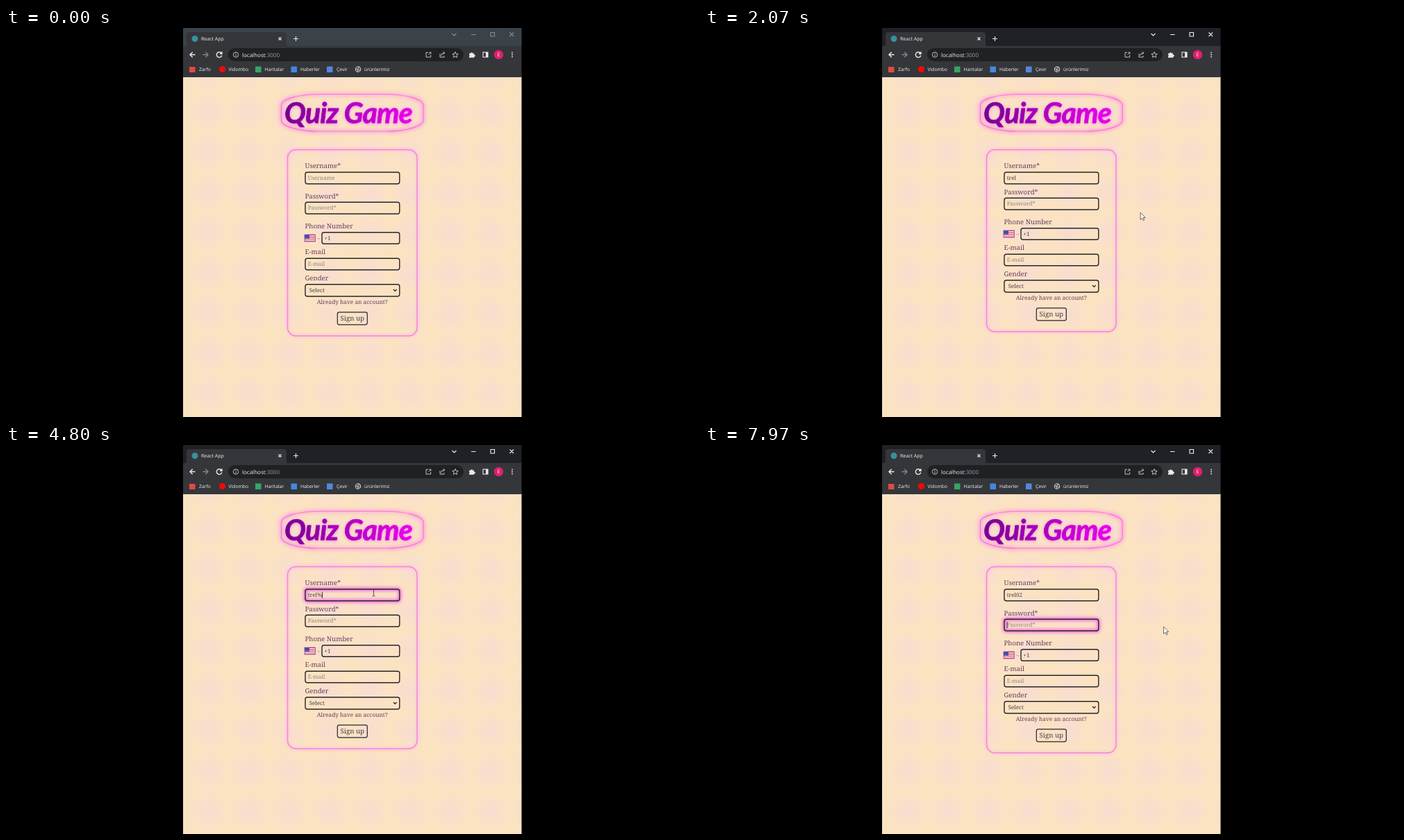
Recreate the animation shown at these times as an HTML page. Size 998 by 561 pixels, loop 8 s.

```html
<!DOCTYPE html>
<html lang="en">
<head>
<meta charset="utf-8">
<title>Quiz Game</title>
<style>
  html, body { margin: 0; width: 100%; height: 100%; overflow: hidden; background: #000; }
  svg { display: block; width: 100%; height: 100%; text-rendering: geometricPrecision; }
  .ui { font: 6.8px "Open Sans", sans-serif; fill: #f1f1f2; }
  .icon { fill: none; stroke: #e8eaed; stroke-width: 1.1; }
  .form { font: 8px "Noto Serif", serif; fill: #4a3d42; }
  .label { font-size: 9.6px; fill: #633f64; }
  .hint { fill: #91857a; }
  .box { fill: none; stroke: #29252a; stroke-width: 1.4; }
  .focus { filter: drop-shadow(0 0 2px #f03cf0) drop-shadow(0 0 2px #f03cf0); }
  .card { fill: none; stroke: #fb7de6; stroke-width: 1.4; filter: drop-shadow(0 0 2px #ff9cec); }
  .frame { fill: none; stroke: #ff70df; stroke-width: 1.2;
           filter: drop-shadow(0 0 2px #ff70e4) drop-shadow(0 0 3px #ff8be2); }
  .title { font: italic 700 41px Lato, sans-serif; letter-spacing: -.8px; fill: url(#ink);
           stroke: url(#ink); stroke-width: .8; stroke-linejoin: round;
           filter: drop-shadow(0 1px 2px #f08be0); }
  .note { font: 700 6.6px "Noto Serif", serif; fill: #fff; }
</style>
</head>
<body>
<svg viewBox="0 0 998 561">
  <defs>
    <linearGradient id="ink" gradientUnits="userSpaceOnUse" x1="402" x2="597" y1="0" y2="0">
      <stop offset="0" stop-color="#78008f"/>
      <stop offset=".5" stop-color="#b500c6"/>
      <stop offset="1" stop-color="#f600f6"/>
    </linearGradient>
    <radialGradient id="blush">
      <stop offset="0" stop-color="#f7dad6" stop-opacity=".75"/>
      <stop offset="1" stop-color="#f7dad6" stop-opacity="0"/>
    </radialGradient>
    <pattern id="paper" width="58" height="58" patternUnits="userSpaceOnUse" x="263" y="93">
      <rect width="58" height="58" fill="#fbe3c2"/>
      <circle cx="29" cy="29" r="29" fill="url(#blush)"/>
    </pattern>
  </defs>

  <rect width="998" height="561"/>
  <rect x="255" y="70" width="487.5" height="491" fill="url(#paper)"/>

  <!-- Browser window -->
  <rect id="strip" x="255" width="487.5" height="27"/>
  <rect x="255" y="26" width="487.5" height="45" fill="#35363a"/>
  <path d="M257 26.5q3 0 3-4V10q0-4 4-4h136q4 0 4 4v12.500q0 4 3 4z" fill="#35363a"/>
  <rect x="320" y="29" width="339" height="19" rx="9.500" fill="#202124"/>
  <circle cx="272" cy="15.500" r="4.500" fill="#3c8ea0"/>
  <g class="ui">
    <text x="281" y="18" font-size="7">React App</text>
    <text x="340" y="41.500" font-size="8">localhost<tspan fill="#9aa0a6">:3000</tspan></text>
    <text x="278" y="62">Zarfo</text>
    <text x="320.500" y="62">Vidombo</text>
    <text x="372.500" y="62">Haritalar</text>
    <text x="424" y="62">Haberler</text>
    <text x="476" y="62">Çevir</text>
    <text x="516" y="62">ürünlerimiz</text>
    <circle cx="709.500" cy="38.500" r="6.700" fill="#e01f6c"/>
    <text x="709.500" y="41.300" font-size="7.500" text-anchor="middle">E</text>
  </g>
  <rect x="264" y="56" width="8.500" height="8" fill="#df4b41"/>
  <circle cx="311.500" cy="59.500" r="4.600" fill="#f00a0a"/>
  <rect x="359" y="55.500" width="8.500" height="8.500" fill="#36a564"/>
  <rect x="410.500" y="55.500" width="8.500" height="8.500" fill="#4387e0"/>
  <rect x="462" y="55.500" width="8.500" height="8.500" fill="#5089df"/>
  <g class="icon">
    <path d="M392.500 13.500l4 4m0-4l-4 4M414 15.500h7m-3.500-3.500v7"/>
    <path d="M272.500 38.500h-7.500m3.700-3.700l-3.700 3.700l3.700 3.700" stroke-width="1.4"/>
    <path d="M283.500 38.500h7.500m-3.700-3.700l3.700 3.700l-3.700 3.700" stroke="#85888d" stroke-width="1.3"/>
    <path d="M310.300 36.500a3.800 3.800 0 1 0 .5 3M311 34.300v3h-3" stroke-width="1.4"/>
    <g stroke="#bfc2c7" stroke-width="1">
      <circle cx="331" cy="38.500" r="3.700"/>
      <path d="M331 38v2.500m0-4.300v.9"/>
      <path d="M608 35.300h-3v6.700h6.700v-3M608.500 38.500l3.400-3.400m-2.400 0h2.400v2.400"/>
      <path d="M625 37v5h6v-2M626.500 40q.5-4 5-4m-2-2l2.300 2l-2.300 2"/>
      <path d="M647 34.500l1.200 2.700 3 .3-2.300 2 .7 2.900-2.600-1.500-2.600 1.500.7-2.900-2.300-2 3-.3z"/>
    </g>
    <path d="M667 36.500h2.300a1.300 1.300 0 1 1 2.600 0h2.100v2.300a1.300 1.300 0 1 1 0 2.400v1.500h-7v-2a1.300 1.300 0 0 0 0-2.300z" fill="#e8eaed" stroke="none"/>
    <rect x="687" y="35" width="7" height="7"/>
    <rect x="691" y="35" width="3" height="7" fill="#e8eaed" stroke="none"/>
    <path d="M729 35.500v0m0 3v0m0 3v0" stroke-width="1.800" stroke-linecap="round"/>
    <circle cx="507" cy="59.500" r="3.700" stroke="#c4c7cc"/>
    <path d="M503.500 58.500l3 1.500l1-3h2.500M506 63l1-2.500l3 0" stroke="#c4c7cc"/>
  </g>
  <path id="controls" class="icon" d="M642.500 8l3 3l3-3M670 9.500h6.500M698 6.500h5.500v5.500h-5.500zM725.500 6.500l5.500 5.500m0-5.500l-5.500 5.500"/>

  <!-- Page -->
  <rect class="frame" x="396.500" y="95.500" width="204.500" height="53.500" rx="55" ry="16"/>
  <text class="title" x="401" y="137">Quiz Game</text>
  <rect id="card" class="card" x="405.500" y="175.500" width="186.500" rx="12"/>
  <g class="form">
    <text class="label" x="430.500" y="202.300">Username*</text>
    <rect id="nameBox" class="box" x="431" y="208" width="135.800" height="16.700" rx="3"/>
    <text id="name" x="434.700" y="219"></text>

    <g id="note">
      <rect x="432" y="228" width="133" height="17" rx="3" fill="#ee00ee"/>
      <circle cx="456.300" cy="236.700" r="4.700" fill="none" stroke="#fff"/>
      <path d="M456.300 233.700v3.500m0 1.200v1.200" stroke="#fff" stroke-width="1.100"/>
      <text class="note" x="462" y="235">Username must contain;</text>
      <text class="note" id="rule" x="462" y="243"></text>
    </g>

    <g id="below">
      <text class="label" x="430.500" y="245.500">Password*</text>
      <rect id="passBox" class="box" x="431" y="251.300" width="135.800" height="16.700" rx="3"/>
      <text class="hint" x="434.700" y="262.300">Password*</text>

      <text class="label" x="430.500" y="288.800">Phone Number</text>
      <rect x="430" y="298" width="15.500" height="10" fill="#fff"/>
      <path d="M430 298.700h15.500m-15.500 2.800h15.500m-15.500 2.800h15.500m-15.500 2.800h15.500" stroke="#e0344c" stroke-width="1.300"/>
      <rect x="430" y="298" width="7" height="5.500" fill="#3d52a8"/>
      <rect x="430" y="298" width="15.500" height="10" fill="none" stroke="#8246c0" stroke-width=".8"/>
      <path d="M448.500 303l1.700 1.500l1.700-1.500" fill="none" stroke="#a5968d" stroke-width=".9"/>
      <rect class="box" x="455" y="294.800" width="111.800" height="16.500" rx="3"/>
      <text x="458.500" y="305.800">+1</text>

      <text class="label" x="430.500" y="326.200">E-mail</text>
      <rect class="box" x="431" y="332.300" width="135.800" height="16.500" rx="3"/>
      <text class="hint" x="434.700" y="343.200">E-mail</text>

      <text class="label" x="430.500" y="363.500">Gender</text>
      <rect class="box" x="431" y="369.700" width="135.800" height="17.300" rx="3"/>
      <text x="436.700" y="381.200">Select</text>
      <path d="M558 377l2.300 2.400l2.300-2.400" fill="none" stroke="#222" stroke-width="1.300"/>

      <text class="label" x="498.700" y="398.200" text-anchor="middle" style="font-size:8.300px">Already have an account?</text>
      <rect class="box" x="477.300" y="409.800" width="43" height="18" rx="2.500" style="stroke-width:1.200"/>
      <text x="498.800" y="422" text-anchor="middle" style="font-size:9.700px">Sign up</text>
    </g>
    <path id="caret" d="M0 0v9" stroke="#222" stroke-width=".9"/>
  </g>

  <path id="arrow" d="M0 0v10.300l2.300-2.200l1.700 3.600l1.700-.8l-1.700-3.400h3.200z" fill="#fff" stroke="#333" stroke-width=".7"/>
  <path id="beam" d="M-2-5q2 0 2 1q0-1 2-1M0-4v8M-2 5q2 0 2-1q0 1 2 1" fill="none" stroke="#444" stroke-width=".9"/>
</svg>
<script>
const LOOP = 8000;
const $ = id => document.getElementById(id);

// Each entry holds from its time until the next one.
const typed = [[0, ''], [1280, 't'], [1370, 'tr'], [1470, 'tre'], [1570, 'trel'],
  [2950, 'trel%'], [5250, 'trel'], [5450, 'trel0'], [5650, 'trel02']];
const focused = [[0, ''], [1000, 'name'], [2030, ''], [2650, 'name'], [3680, ''],
  [4600, 'name'], [6900, 'pass']];
const shifts = [[0, 0], [1280, -6], [2120, 17], [2650, -6], [3720, 17], [4600, -6], [6900, 0]];
const pointer = [[560, 736, 330], [950, 555, 217], [1650, 555, 217], [1950, 627, 266],
  [2120, 627, 266], [2480, 556, 217], [3380, 556, 217], [3640, 634.5, 246], [3850, 634.5, 246],
  [4000, 664, 240], [4200, 634, 236], [4540, 529.5, 213], [5880, 529.5, 213],
  [6350, 648.5, 224], [7480, 648.5, 224], [7880, 660.5, 262]];

const current = (steps, t) => steps.filter(s => s[0] <= t).pop();
const ease = u => u * u * (3 - 2 * u);

function pointerAt(t) {
  const from = current(pointer, t);
  if (!from) return null;
  const to = pointer[pointer.indexOf(from) + 1] || from;
  const u = to === from ? 0 : ease((t - from[0]) / (to[0] - from[0]));
  return [1, 2].map(i => from[i] + (to[i] - from[i]) * u);
}

function place(el, visible, x = 0, y = 0) {
  el.style.display = visible ? '' : 'none';
  el.setAttribute('transform', `translate(${x} ${y})`);
}

function draw(t) {
  const active = t >= 600;
  $('strip').setAttribute('fill', active ? '#1f2127' : '#3a434a');
  $('controls').style.stroke = active ? '#f1f1f2' : '#8b9195';

  const [typedAt, text] = current(typed, t);
  const [focusAt, field] = current(focused, t);
  const shift = current(shifts, t)[1];

  $('name').textContent = text || 'Username';
  $('name').setAttribute('class', text ? '' : 'hint');
  $('nameBox').classList.toggle('focus', field === 'name');
  $('passBox').classList.toggle('focus', field === 'pass');
  $('card').setAttribute('height', 268.5 + shift);
  place($('below'), true, 0, shift);
  place($('note'), shift > 0);
  $('rule').textContent = t < 3000 ? '• At least 5 characters.' : '• No special characters.';

  const blinkStart = Math.max(focusAt, typedAt);
  const inName = field === 'name';
  const caretX = 435 + (inName && text ? $('name').getComputedTextLength() : 0);
  place($('caret'), field && (t - blinkStart) % 1000 < 530, caretX, inName ? 212 : 255.2 + shift);

  const [x, y] = pointerAt(t) || [0, 0];
  const overName = x > 430 && x < 567 && y > 207 && y < 225;
  place($('arrow'), x && !overName, x, y);
  place($('beam'), overName, x, y);
}

function tick() {
  draw(performance.now() % LOOP);
  requestAnimationFrame(tick);
}
tick();
</script>
</body>
</html>
```
